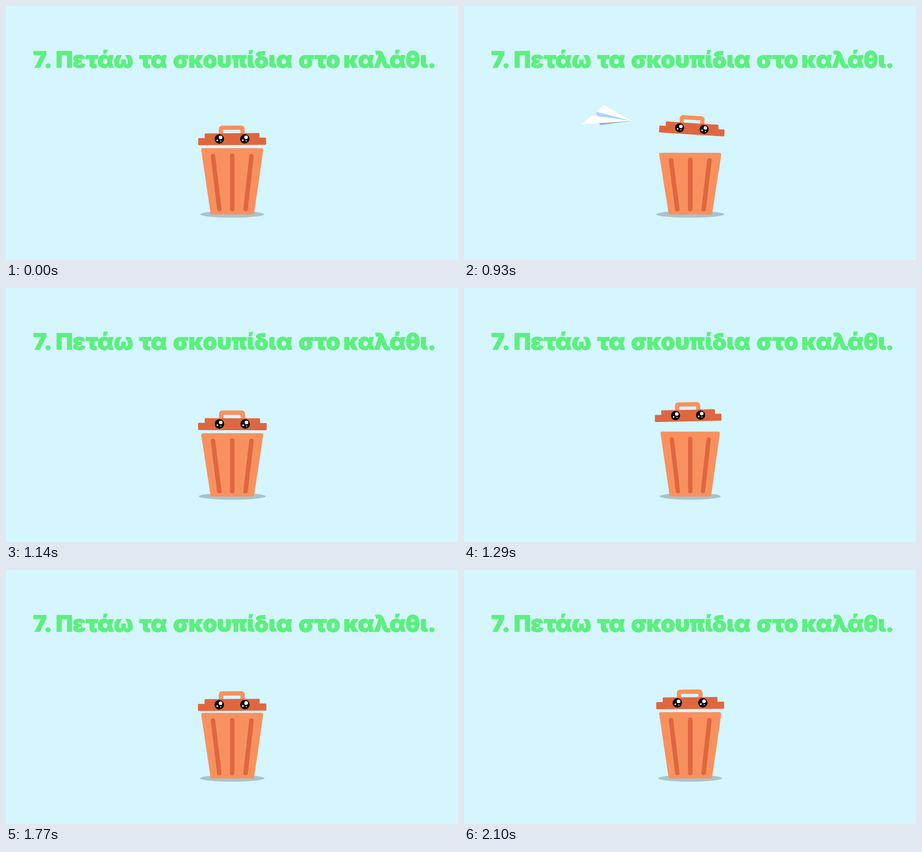
Recreate the animation shown at these times as an HTML page. Size 998 by 561 pixels, loop 2.7 s.

```html
<!DOCTYPE html>
<html lang="el">
<head>
<meta charset="utf-8">
<style>
  html, body { margin: 0; width: 100%; height: 100%; overflow: hidden; background: #d5f5ff; }
  svg { display: block; width: 100%; height: 100%; }
  text { font: 900 50px Inter, "Noto Sans", sans-serif; fill: #5bf07e; stroke: #5bf07e; stroke-width: 1.4; stroke-linejoin: round; }
  .light { fill: #f9915e; stroke: #f9915e; stroke-linejoin: round; }
  .dark { fill: #df6740; }
  .ribs { stroke: #df6740; stroke-width: 10; stroke-linecap: round; }
</style>
</head>
<body>
<svg viewBox="0 0 998 561">
  <defs>
    <clipPath id="sky"><path d="M187 0H998V561H187z"/></clipPath>
    <g id="eye">
      <circle r="10.4"/>
      <g fill="#fff">
        <circle cx="2.8" cy="-3.4" r="4"/>
        <circle cx="-4.4" cy="2.8" r="1.9"/>
        <circle cx="3.2" cy="4.5" r="1.2"/>
      </g>
    </g>
  </defs>

  <text y="136"><tspan x="60">7.</tspan><tspan x="110">Πετάω</tspan><tspan x="294">τα</tspan><tspan x="369">σκουπίδια</tspan><tspan x="646">στο</tspan><tspan x="745">καλάθι.</tspan></text>

  <ellipse id="shadow" cx="499.5" cy="460" ry="7.5" fill="#a9c3cb"/>

  <g clip-path="url(#sky)">
    <g id="plane">
      <path d="M-72 18L-66 23L0 0z" fill="#93b3c4"/>
      <path d="M-81 -4L0 0L-78 6z" fill="#a9d5ff"/>
      <path d="M-68 -22L0 0L-81 -4zM-89 5.5L0 0L-108 30z" fill="#fff"/>
    </g>
  </g>

  <g id="bin">
    <path class="light" stroke-width="8" d="M-64.5 -142.5H64.5L44.5 -4H-44z"/>
    <path class="ribs" d="M-42.5 -129L-28.5 -12M0 -130V-12M42.5 -129L29.5 -12"/>
  </g>

  <g id="lid">
    <path d="M-24.5 -10V-22Q-24.5 -24.7 -21.5 -24.7H20Q23 -24.7 23 -22V-10" fill="none" stroke="#f9915e" stroke-width="9.5"/>
    <rect class="dark" x="-60.5" y="-12.5" width="121" height="20" rx="2"/>
    <rect class="dark" x="-75" y="-2.3" width="150" height="15.8" rx="2"/>
    <use href="#eye" x="-28.3"/>
    <use href="#eye" x="28"/>
  </g>
</svg>
<script>
const LOOP = 2700, STEP = 30;

// turning points of the bounce; whatever is left out is at rest
const bounce = [
  { t: 0 },
  { t: 780 },
  { t: 1020, dx: 5.7, dy: -33, tilt: 5.8, squash: .1 },
  { t: 1170, dy: 11, squash: .04 },
  { t: 1350, dx: -5.9, dy: -20, tilt: -1, squash: -.073 },
  { t: 1530, dx: 2.4, dy: 16, tilt: 2.4, squash: .06 },
  { t: 1710 },
  { t: 1890, dy: 16, squash: .04 },
  { t: 2100 },
  { t: LOOP }
];

const el = id => document.getElementById(id);
const [shadow, plane, bin, lid] = ["shadow", "plane", "bin", "lid"].map(el);
const place = (node, transform) => node.setAttribute("transform", transform);

function drawBin(t) {
  const i = bounce.findIndex(k => k.t > t);
  const a = bounce[i - 1], b = bounce[i];
  const u = (1 - Math.cos(Math.PI * (t - a.t) / (b.t - a.t))) / 2;
  const mix = (key) => (a[key] || 0) * (1 - u) + (b[key] || 0) * u;
  const dy = mix("dy"), squash = mix("squash");

  // the lid looks larger the lower it is
  place(lid, `translate(${499.3 + mix("dx")} ${293.5 + dy}) rotate(${mix("tilt") - .4}) scale(${1 + .0016 * dy})`);
  // a squashed bin gets lower, a stretched one narrower
  const sx = Math.min(1, 1 + squash);
  const sy = 1 - Math.max(squash, -squash / 2);
  place(bin, `translate(499.5 460.5) scale(${sx} ${sy})`);
  shadow.setAttribute("rx", 70.5 * (1 + squash));
}

// the plane glides in, levelling out, then dives into the bin
function drawPlane(t) {
  const u = (t - 780) / 240;
  const glide = Math.min(u, 1), dive = Math.max(0, u - 1) * 2;
  const x = 212 + 254 * glide + 36 * dive;
  const y = 176 + 110 * glide * (1.35 - .35 * glide) + 160 * dive;
  plane.style.display = u >= 0 && dive < 1 ? "" : "none";
  place(plane, `translate(${x} ${y}) rotate(${31 * (1 - glide) + 86 * dive})`);
}

const start = performance.now();
function tick() {
  const elapsed = (performance.now() - start) % LOOP;
  const t = Math.floor(elapsed / STEP) * STEP;
  drawBin(t);
  drawPlane(t);
  requestAnimationFrame(tick);
}
tick();
</script>
</body>
</html>
```
